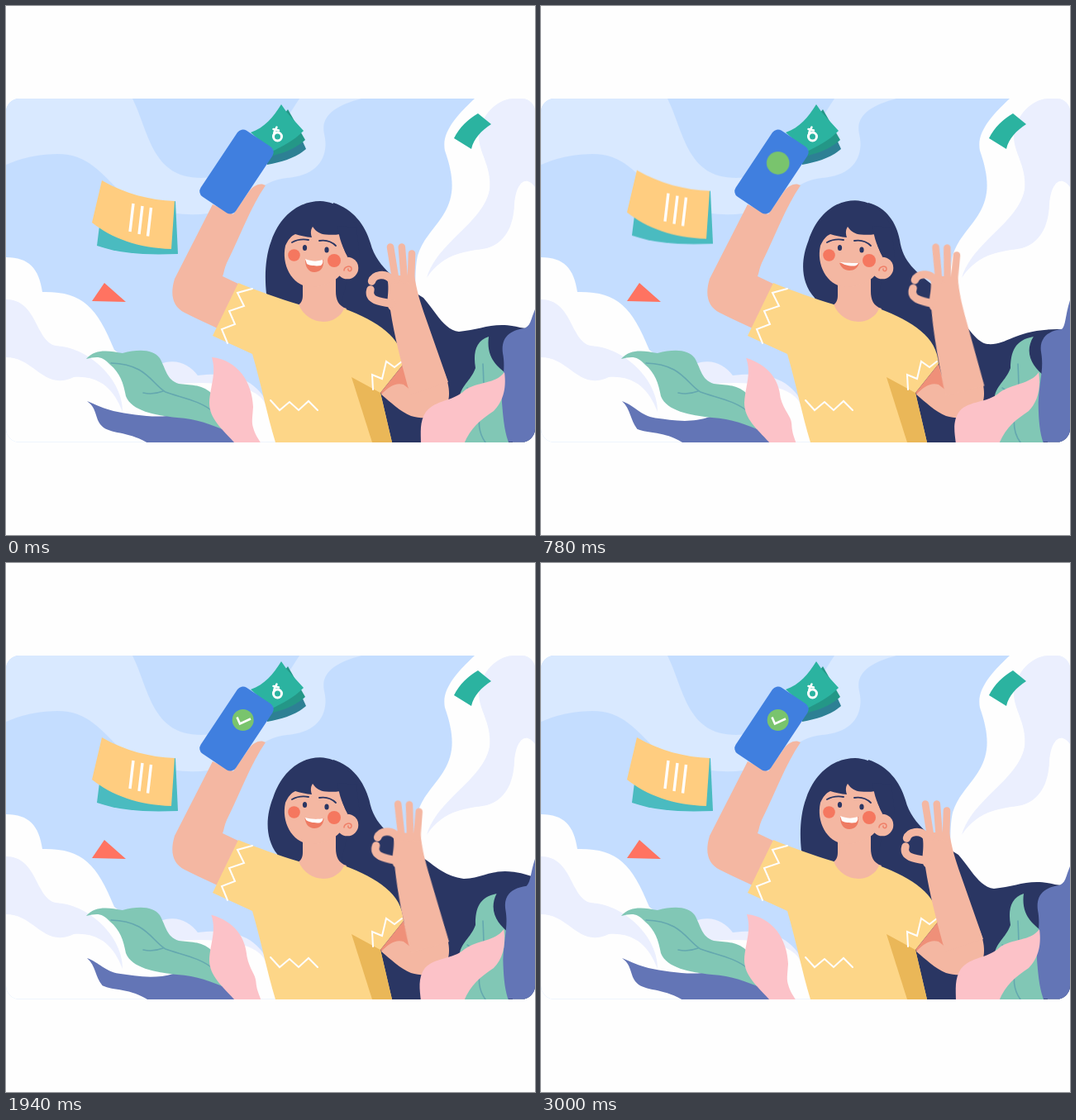
Animation of 640 by 640 pixels, one loop 3020 ms. Source, as an HTML page:

```html
<!DOCTYPE html>
<html lang="en">
<head>
<meta charset="utf-8">
<title>Payment success</title>
<style>
  html, body { margin: 0; width: 100%; height: 100%; overflow: hidden; background: #fefefe; }
  svg { display: block; width: 100vw; height: 100vh; }

  .skin { fill: #f4b7a2; }
  .navy { fill: #2a3663; }
  .blue { fill: #6375b6; }
  .leaf { fill: #81c7b5; }
  .pink { fill: #fcc2c8; }
  .haze { fill: #ebeffe; }
  .white { fill: #fefefe; }
  .line { fill: none; stroke: #fefefe; stroke-width: 2; stroke-linecap: round; }
  .vein { fill: none; stroke: #64a8af; stroke-width: 1.6; stroke-linecap: round; }
  .limb { fill: none; stroke: #f4b7a2; stroke-width: 8.6; stroke-linecap: round; }
  .brow { fill: none; stroke: #2a3663; stroke-width: 1.8; stroke-linecap: round; }

  .move { animation: 3020ms linear infinite; }
  .sway { animation: 3020ms cubic-bezier(.3, .3, .5, 1) infinite; }

  #paper { animation-name: paper; }
  #forearm { animation-name: wave; transform-origin: 468px 478px; }
  #badge { animation-name: pop; transform-origin: 286.7px 190px; }
  #tick { animation-name: tick; stroke-dasharray: 1 2; }
  #head { animation-name: head; }
  #tail { animation-name: tail; animation-timing-function: ease-in-out; }
  #lips { animation-name: lips; }
  #teeth { animation-name: teeth; }
  #lips, #teeth { animation-timing-function: ease-in-out; }
  #bush { animation-name: bush; }
  #frond { animation-name: frond; }
  #petal { animation-name: petal; }
  #bud { animation-name: bud; }
  #root { animation-name: root; }

  @keyframes paper {
    0% { transform: none; animation-timing-function: cubic-bezier(.17, .17, .67, 1); }
    30.46% { transform: translateY(-13px); animation-timing-function: cubic-bezier(.33, 0, .83, .83); }
    60.93%, 100% { transform: none; }
  }
  @keyframes wave {
    0%, 7.95% { transform: rotate(0deg); animation-timing-function: cubic-bezier(.3, .1, .5, 1); }
    43% { transform: rotate(5.8deg); }
    53.6% { transform: rotate(6deg); animation-timing-function: ease-in-out; }
    74.2%, 100% { transform: rotate(0deg); }
  }
  @keyframes pop {
    0%, 5.3% { transform: scale(0); }
    20.5% { transform: scale(1); }
    25% { transform: scale(1.07); }
    33.1%, 100% { transform: scale(1); }
  }
  @keyframes tick {
    0%, 27.8% { stroke-dashoffset: 1.15; }
    27.9% { stroke-dashoffset: 1; }
    55.6%, 100% { stroke-dashoffset: 0; }
  }
  @keyframes head {
    41.4% {
      d: path("M380 235C358 235 335 250 324 284C315 306 313 334 334 354L345 385H400L420 300L425 270C418 250 402 236 380 235Z");
      animation-timing-function: ease-in-out;
    }
  }
  @keyframes tail {
    7.95% { d: path("M396 238C420 246 434 264 440 287C448 318 477 335 504 353C519 370 528 390 542 393C565 399 590 382 622 390L645 392V530H440L380 400Z"); }
    25.83% { d: path("M396 238C418 244 430 262 434 283C438 310 453 321 478 341C505 365 520 406 540 409C565 411 570 392 625 391L645 392V530H440L380 400Z"); }
    37.09% { d: path("M396 238C418 244 430 262 434 283C438 310 455 321 480 341C505 358 525 412 552 409C578 405 590 396 632 392L645 392V530H440L380 400Z"); }
    52.98% { d: path("M396 238C418 244 432 264 438 287C441 315 452 328 500 358C516 368 528 385 555 390C580 391 590 374 632 383L645 385V530H440L380 400Z"); }
    75.5% { d: path("M396 238C420 246 434 264 441 287C449 318 478 335 505 353C520 362 530 372 552 374C580 374 590 354 640 375L645 378V530H440L380 400Z"); }
  }
  @keyframes lips {
    7.95%, 25.83%, 52.98% { d: path("M361 311C368 311 378 311 385 311C383 317 379 320 373 320C367 320 363 316 361 311Z"); }
    37.09%, 75.5% { d: path("M362 307C368 309 378 309 384 307C385 317 380 322 373 322C366 322 362 316 362 307Z"); }
  }
  @keyframes teeth {
    7.95%, 25.83%, 52.98% { d: path("M362 310C368 311 378 311 384 311C383 313 381 314.5 379 314.5C373 315 366 313 362 310Z"); }
    37.09%, 75.5% { d: path("M362 306C368 309 378 309 383 307C384 310 383 312 381 314C375 315 367 314 364 312Z"); }
  }
  @keyframes bush {
    41.4% {
      d: path("M645 342L640 354C634 374 635 386 631 391C610 394 603 405 606 420C609 440 604 450 602 480C602 505 604 518 608 530H645Z");
      animation-timing-function: ease-in-out;
    }
  }
  @keyframes frond {
    41.4% {
      d: path("M598 400C574 404 569 418 568 438C562 455 546 462 549 480C560 500 555 515 553 530H612V450C597 440 583 420 598 400Z");
      animation-timing-function: ease-in-out;
    }
  }
  @keyframes petal {
    41.4% {
      d: path("M602 443C592 458 570 457 555 468C540 481 518 477 506 490C497 502 500 516 502 530H554C562 510 575 500 590 490C600 480 605 465 602 443Z");
      animation-timing-function: ease-in-out;
    }
  }
  @keyframes bud {
    41.4% {
      d: path("M248 426C275 436 286 452 288 472C293 488 304 495 304 505C304 515 306 520 309 530H278C262 512 246 500 246 480C247 460 255 445 248 426Z");
      animation-timing-function: ease-in-out;
    }
  }
  @keyframes root {
    41.4% {
      d: path("M98 478C115 484 120 497 140 500C160 502 180 507 207 497C230 495 240 499 262 512L282 530H174C150 513 130 518 116 512C108 500 108 488 98 478Z");
      animation-timing-function: ease-in-out;
    }
  }
</style>
</head>
<body>
<svg viewBox="0 0 640 640">
  <clipPath id="card"><rect y="112" width="640" height="415.6" rx="16"/></clipPath>
  <g clip-path="url(#card)">

    <!-- sky and clouds -->
    <rect y="112" width="640" height="416" fill="#c4ddff"/>
    <path fill="#d9e9ff" d="M0 112H153C173 152 176 208 236 208C300 206 330 150 355 112H430C400 120 380 132 385 155C392 185 374 206 340 208C300 212 290 247 245 251C205 256 165 245 138 224C115 203 100 179 62 179C30 180 15 186 0 192Z"/>
    <path class="white" d="M567 112C548 130 526 152 531 175C538 195 541 212 539 226C534 260 507 272 498 302C493 325 496 360 500 440H645V112Z"/>
    <path class="haze" d="M612 112C592 114 575 133 572 155C571 178 588 192 585 222C578 262 522 285 509 329C530 297 560 297 582 293C605 286 614 265 615 240C617 215 628 203 640 219V112Z"/>
    <path class="haze" d="M185 434C205 425 222 434 232 447C260 444 296 444 315 478V528H185Z"/>
    <path class="white" d="M180 460C240 452 300 455 313 480L335 528H180Z"/>
    <path class="white" d="M0 304C28 304 40 318 44 346C92 345 110 364 131 416L200 470V528H0Z"/>
    <path class="haze" d="M0 355C38 355 35 405 60 411C105 414 142 456 141 491C130 462 112 447 82 449C45 466 35 425 0 425Z"/>

    <!-- flying papers -->
    <g id="paper" class="move">
      <path fill="#4abbc0" d="M113 266L110 290C142 301 174 301 208 300L205 236Z"/>
      <path fill="#ffcd80" d="M116 211C144 227 174 235 204 236L200 294C160 293 128 281 104 262Z"/>
      <path class="line" style="stroke-width:3.4;stroke-linecap:butt" d="M154 239L150 273M165 242L161 276M175.500 244L171.500 278.500"/>
    </g>
    <path fill="#2bb3a0" d="M571 130L587 143C575 151 566 160 563 173L542 160C549 146 559 137 571 130Z"/>
    <path fill="#ff7361" d="M119 335L145 358L104 357Z"/>

    <!-- hair -->
    <path id="tail" class="navy move" d="M396 238C420 246 434 264 441 287C449 318 478 335 505 353C520 370 530 392 548 394C575 392 590 381 622 389L645 392V530H440L380 400Z"/>
    <path id="head" class="navy sway" d="M380 236C358 236 333 250 321 284C313 305 313 330 315 348L335 385H400L420 300L425 270C418 250 402 237 380 236Z"/>

    <!-- raised arm, cash and phone -->
    <path class="skin" d="M250 240L204 330C198 350 202 364 216 371C232 379 245 385 258 391L283 337L262 327C264 322 264 318 267 311C285 275 295 245 314 217C308 213 300 217 295 223L275 252Z"/>
    <path fill="#2d8094" d="M355 155L363 173C350 184 335 188 316 192L310 170Z"/>
    <path fill="#249787" d="M341 125L362 162C348 174 335 178 318 182L310 165Z"/>
    <path fill="#2bb3a0" d="M333 119L340 129L360 151C347 164 335 169 322 176L296 153C313 147 323 135 333 119Z"/>
    <circle class="line" cx="328.500" cy="158" r="5" style="stroke-width:3"/>
    <path class="line" style="stroke-width:2.500" d="M323.500 158Q324 152 327.500 146.500M323.500 149L330 150.500"/>
    <rect x="253.500" y="152.500" width="51" height="96" rx="8" fill="#407fdf" transform="rotate(33.7 279 200.5)"/>
    <g id="badge" class="move">
      <circle cx="286.700" cy="190" r="13" fill="#79c46d"/>
      <path id="tick" class="line move" style="stroke-width:2.600;stroke-linecap:butt" pathLength="1" d="M279.500 186.500L283 194.500L296 188.500"/>
    </g>

    <!-- face and neck -->
    <path class="skin" d="M359 325V350C359 356 357 360 352 363L365 395H400L412 366C402 363 399 355 399 345V315Z"/>
    <path class="skin" d="M338 290C341 283 345 278 350 276C357 278 363 279.500 370 280C368 274 369 270 371 267C375 273 380 276 387 276.500C393 277 399 277 404 276C406 287 409 296 413 303L408 320C402 332 386 340 368 340C345 338 333 312 338 290Z"/>
    <path class="navy" d="M401 266C403 282 408 294 414 304L428 304L424 268Z"/>
    <circle class="skin" cx="413" cy="317" r="13.300"/>
    <path fill="none" stroke="#ef7f68" stroke-width="1.500" stroke-linecap="round" d="M409 320C409 315 418 313 418 318C418 322 413 321 414 318"/>
    <circle cx="348.500" cy="301.500" r="7.300" fill="#f5775f"/>
    <circle cx="397" cy="308" r="8" fill="#f5775f"/>
    <ellipse class="navy" cx="361.500" cy="292.500" rx="2.600" ry="3.600"/>
    <ellipse class="navy" cx="388" cy="295" rx="2.600" ry="3.600"/>
    <path class="brow" d="M346 286Q355 281 366 283M379 284Q391 282 399 290"/>
    <path id="lips" class="move" fill="#ee7b63" d="M362 307C368 309 378 309 384 307C385 317 380 322 373 322C366 322 362 316 362 307Z"/>
    <path id="teeth" class="white move" d="M362 306C368 309 378 309 383 307C384 310 383 312 381 314C375 315 367 314 364 312Z"/>

    <!-- shirt -->
    <path fill="#fdd688" d="M281 335L250 399L298 421C308 455 316 495 326 528H467L453 468L481 433C479 400 450 382 409 366C400 388 365 388 354 361C330 354 303 344 281 335Z"/>
    <path fill="#eab758" d="M418 449L453 468L467 528H443Z"/>
    <path class="line" d="M298 342L280 347L288 363L270 369L277 385L261 391L268 408"/>
    <path class="line" d="M444 464L443 446L455 451L460 430L470 437L479 430"/>
    <path class="line" d="M320 477L331 489L343 479L354 489L366 478L377 489"/>

    <!-- waving arm -->
    <path fill="#ef9079" d="M481 433L490 466L455 470L453 468Z"/>
    <path class="skin" d="M454 470C463 460 472 455 481 458L490 465L529 440C537 458 539 476 531 487C522 500 505 500 490 496C477 491 465 479 454 470Z"/>
    <g id="forearm" class="move">
      <path class="skin" d="M462 334C466 329 470 327 474 326H494C497 345 501 358 508 378L535 455L490 470L486 460C478 430 470 400 465 368C458 362 464 350 462 334Z"/>
      <path class="limb" d="M465 291.500L471.500 332M478.800 291.500L482 332M491 299.500L490 332"/>
      <path class="limb" d="M466 331C459 322 445 325 442.500 333M441 343C437 356 452 358 467 360" style="stroke-width:9.400"/>
    </g>

    <!-- foliage -->
    <path id="root" class="blue sway" d="M98 478C110 483 118 487 130 490C150 494 175 498 195 496C220 495 240 497 262 512L282 530H174C150 515 130 518 118 510C106 500 112 488 98 478Z"/>
    <path class="leaf" d="M97 427C108 414 125 417 141 420C160 415 178 415 186 426C194 440 194 452 209 457C222 459 236 457 248 468L266 514C250 507 230 499 207 498C180 495 152 490 145 472C142 456 138 444 126 434C116 423 110 424 97 427Z"/>
    <path class="vein" d="M127 432C170 433 176 457 193 467C212 474 235 477 252 492M166 468C175 470 182 469 190 466"/>
    <path id="bud" class="pink sway" d="M249 425C280 428 298 455 299 485C298 500 297 503 299 510C301 518 305 523 309 530H278C262 512 246 500 246 480C247 460 255 445 249 425Z"/>
    <path id="frond" class="leaf sway" d="M584 400C568 405 565 420 568 438C562 455 546 462 549 480C560 500 555 515 553 530H612V450C600 440 580 430 584 400Z"/>
    <path class="vein" d="M577 433C578 455 579 470 575 485C570 503 572 517 580 528M558 462Q565 466 570 474"/>
    <path id="bush" class="blue sway" d="M645 355L640 367C634 382 635 386 627 390C605 393 599 405 601 420C605 440 599 455 600 480C602 505 604 518 609 530H645Z"/>
    <path id="petal" class="pink sway" d="M603 443C592 458 570 454 555 465C540 479 520 476 508 491C500 503 502 516 502 530H554C562 510 575 500 590 490C600 480 606 465 603 443Z"/>
  </g>
</svg>
</body>
</html>
```
